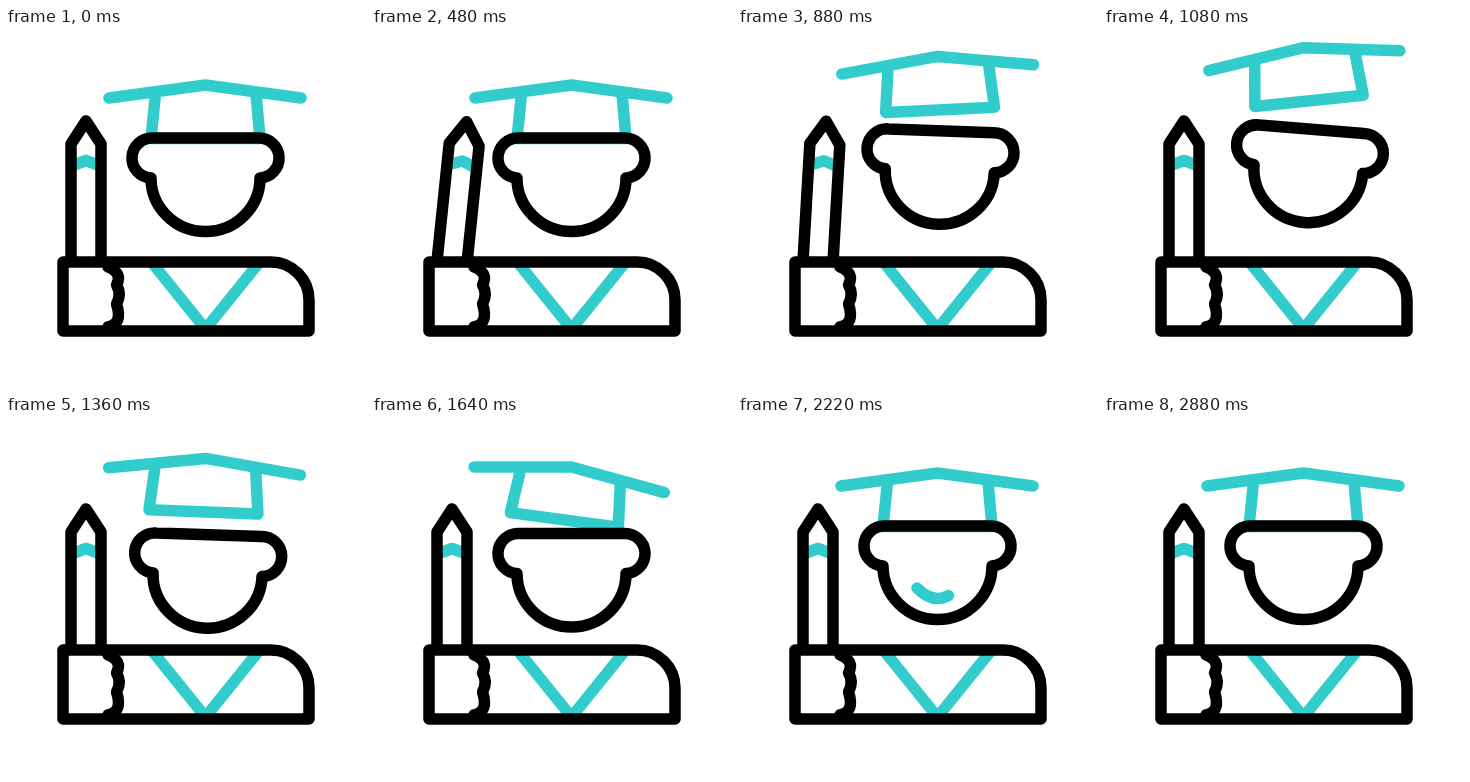
These frames come from a looping animation (360x360 px, 3280 ms). An HTML page:

```html
<!DOCTYPE html>
<html lang="en">
<head>
<meta charset="utf-8">
<title>Graduate</title>
<style>
  html, body { margin: 0; height: 100%; overflow: hidden; background: #fff; }
  svg { display: block; width: 100%; height: 100%; }
  path { fill: none; stroke: #000; stroke-width: 11.5; stroke-linecap: round; stroke-linejoin: round; }
  .teal { stroke: #3cc; }
</style>
</head>
<body>
<svg viewBox="0 0 360 360">
  <path id="cap" class="teal" d="M103 70L199.500 57L295 70M149.500 66L145 110.500H254L250 66"/>
  <path id="head" d="M145 150A20 20 0 0 1 147 110H252A20 20 0 0 1 254 150A54.500 53.500 0 0 1 145 150Z"/>
  <path id="smile" class="teal" pathLength="1" d="M179 172Q199.500 193 220 172"/>
  <g id="pencil">
    <path class="teal" d="M68 137L80 132.500L92 137"/>
    <path d="M65 231V116L80 93L95 116V231"/>
  </g>
  <path class="teal" d="M147 236L199.500 301L252 236"/>
  <path d="M57 234H265A38 38 0 0 1 303 272V303H57Z"/>
  <path d="M102 239Q117 245 110.500 257Q116 266 110.500 276Q117 296 102 299"/>
  <path id="burst" class="teal"/>
</svg>
<script>
const LOOP = 3280;
const $ = id => document.getElementById(id);

function pose(id, x, y, turn, pivotX, pivotY) {
  $(id).setAttribute("transform", `translate(${x} ${y}) rotate(${turn} ${pivotX} ${pivotY})`);
}

function spark(degrees, tail, front) {
  const angle = degrees * Math.PI / 180;
  const at = r => `${124 + r * Math.cos(angle)} ${130 + r * Math.sin(angle)}`;
  return `M${at(tail)}L${at(front)}`;
}

function draw(t) {
  // Eased progress from 0 to 1 between two times.
  const ramp = (from, to) => {
    const u = Math.min(1, Math.max(0, (t - from) / (to - from)));
    return u * u * (3 - 2 * u);
  };

  // The pencil taps the head, which throws the cap up; both then drop and settle.
  const rise = ramp(550, 1040), settle = ramp(1500, 1940);
  const tilt = ramp(720, 1060), untilt = ramp(1060, 1600);
  const lean = tilt - untilt;
  pose("pencil", 0, 0, 13 * (ramp(340, 640) - ramp(640, 1000)), 80, 234);
  pose("cap", 0, -38 * rise + 30 * ramp(1040, 1500) + 8 * settle,
    -6 * tilt + 14 * untilt - 8 * ramp(1600, 1940), 199.5, 57);
  pose("head", 5 * lean, -9.5 * rise + 19.5 * ramp(1040, 1420) - 10 * settle,
    4.6 * lean, 199.5, 149);

  const length = ramp(1940, 2360) - ramp(2600, 2880);
  $("smile").style.visibility = length > 0 ? "visible" : "hidden";
  $("smile").setAttribute("stroke-dasharray", `${length} 2`);

  const tail = 20 + 39 * ramp(600, 760), front = 20 + 39 * ramp(560, 720);
  $("burst").setAttribute("d", t > 560 && t < 760
    ? [-128, -90, -52, 52, 128].map(a => spark(a, tail, front)).join("") : "");
}

const start = performance.now();
function tick() {
  draw((performance.now() - start) % LOOP);
  requestAnimationFrame(tick);
}
tick();
</script>
</body>
</html>
```
